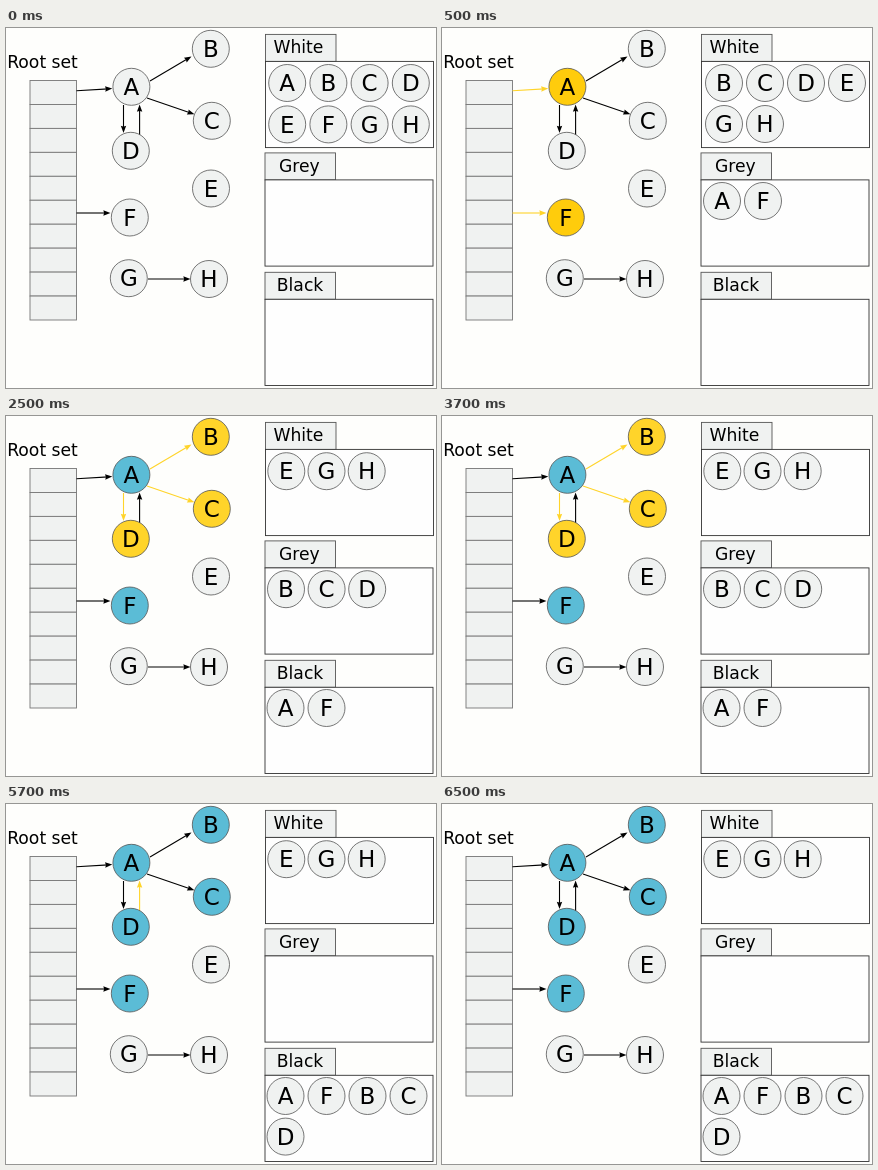
An HTML page that plays this animation: 430 px wide and 360 px high, repeating every 8000 ms.

```html
<!DOCTYPE html>
<html lang="en">
<head>
<meta charset="utf-8">
<title>Tri-colour marking</title>
<style>
  html, body { margin: 0; width: 100%; height: 100%; overflow: hidden; background: #fefefc; }
  svg { display: block; width: 430px; height: 360px; }
  text { font-family: "DejaVu Sans", sans-serif; font-size: 17.2px; fill: #000; }
  .ball text { font-size: 23px; text-anchor: middle; }
  .ball circle { stroke: #555; stroke-width: .8; }
</style>
</head>
<body>
<svg id="stage" viewBox="0 0 430 360"></svg>
<script>
const NS = "http://www.w3.org/2000/svg";
const stage = document.getElementById("stage");
const PALE = "#f0f2f1", AMBER = "#ffcc0c", GOLD = "#ffd42a", BLUE = "#5bbcd6";
const R = 18.5, LOOP = 8000;

function add(parent, tag, attrs, text) {
  const el = document.createElementNS(NS, tag);
  for (const k in attrs) el.setAttribute(k, attrs[k]);
  if (text) el.textContent = text;
  return parent.appendChild(el);
}

function rect(x, y, width, height, fill, stroke) {
  add(stage, "rect", { x, y, width, height, fill, stroke, "stroke-width": 0.9 });
}

function ball(parent, letter, x, y) {
  const g = add(parent, "g", { class: "ball" });
  const disc = add(g, "circle", { cx: x, cy: y, r: R, fill: PALE });
  add(g, "text", { x, y: y + 8.1 }, letter);
  return disc;
}

// Line along the x axis with a swept-back head, turned into place.
function arrow(x1, y1, x2, y2) {
  const len = Math.hypot(x2 - x1, y2 - y1);
  const turn = Math.atan2(y2 - y1, x2 - x1) * 180 / Math.PI;
  const g = add(stage, "g", { transform: `translate(${x1} ${y1}) rotate(${turn})` });
  add(g, "path", { d: `M0 0H${len - 4}`, stroke: "currentColor", "stroke-width": 1.1 });
  add(g, "path", { d: `M${len} 0l-7.2 -2.7q1.6 2.7 0 5.4z`, fill: "currentColor" });
  return g;
}

// Root set
add(stage, "text", { x: 1.2, y: 40.4 }, "Root set");
for (let i = 0; i < 10; i++) rect(24, 52.5 + i * 23.95, 46.5, 23.95, PALE, "#777");

// Object graph
const arrows = {
  rootA: arrow(70.5, 62.8, 106.3, 60.6),
  rootF: arrow(70.5, 185, 104.5, 185),
  AB: arrow(144, 53, 185.5, 28.5),
  AC: arrow(141, 70, 188.5, 86.3),
  AD: arrow(117.5, 77, 117.5, 105),
  DA: arrow(133.6, 107, 133.6, 76.5),
  GH: arrow(142, 251, 184.5, 251)
};
const places = {
  A: [125.4, 58.8], B: [204.8, 20.8], C: [205.8, 92.8], D: [124.8, 122.8],
  E: [205, 160.5], F: [123.8, 189.5], G: [122.8, 250.2], H: [203, 251]
};
const nodes = {};
for (const k in places) nodes[k] = ball(stage, k, ...places[k]);

// Folders
function folder(name, x, y, textX) {
  rect(x, y, 70.5, 27, PALE, "#555");
  rect(x, y + 27, 168, 86.2, "#fefefe", "#333");
  add(stage, "text", { x: textX, y: y + 19 }, name);
}
folder("White", 259.5, 6.4, 267.4);
folder("Grey", 259, 124.9, 273);
folder("Black", 259, 244.3, 270.8);

// Each step: start, node colours, lit arrows, then rows of [letters, x, y, gap].
const steps = [
  { at: 0, fill: {}, lit: [],
    rows: [["ABCD", 281.2, 55, 41.2], ["EFGH", 281.2, 96.4, 41.2]] },
  { at: 500, fill: { AF: AMBER }, lit: ["rootA", "rootF"],
    rows: [["BCDE", 282, 55, 41], ["GH", 282, 96, 41], ["AF", 280, 173, 41]] },
  { at: 2500, fill: { AF: BLUE, BCD: GOLD }, lit: ["AB", "AC", "AD"],
    rows: [["EGH", 280.3, 55.2, 40.2], ["BCD", 280, 173.2, 40.6], ["AF", 279.5, 292, 41]] },
  { at: 4500, fill: { AFBCD: BLUE }, lit: ["DA"],
    rows: [["EGH", 280.3, 55.2, 40.2], ["AFBC", 279.5, 292, 41], ["D", 279.5, 332.6, 41]] },
  { at: 6500, fill: { AFBCD: BLUE }, lit: [],
    rows: [["EGH", 280.3, 55.2, 40.2], ["AFBC", 279.5, 292, 41], ["D", 279.5, 332.6, 41]] }
];
const contents = add(stage, "g", {});
let shown;

function draw(time) {
  const step = steps.findLast(s => s.at <= time);
  if (step === shown) return;
  shown = step;
  for (const k in nodes) {
    const group = Object.keys(step.fill).find(g => g.includes(k));
    nodes[k].setAttribute("fill", group ? step.fill[group] : PALE);
  }
  for (const k in arrows) arrows[k].setAttribute("color", step.lit.includes(k) ? GOLD : "#000");
  contents.replaceChildren();
  for (const [letters, x, y, gap] of step.rows)
    [...letters].forEach((c, i) => ball(contents, c, x + i * gap, y));
}

const start = performance.now();
function tick() {
  draw((performance.now() - start) % LOOP);
  requestAnimationFrame(tick);
}
tick();
</script>
</body>
</html>
```
